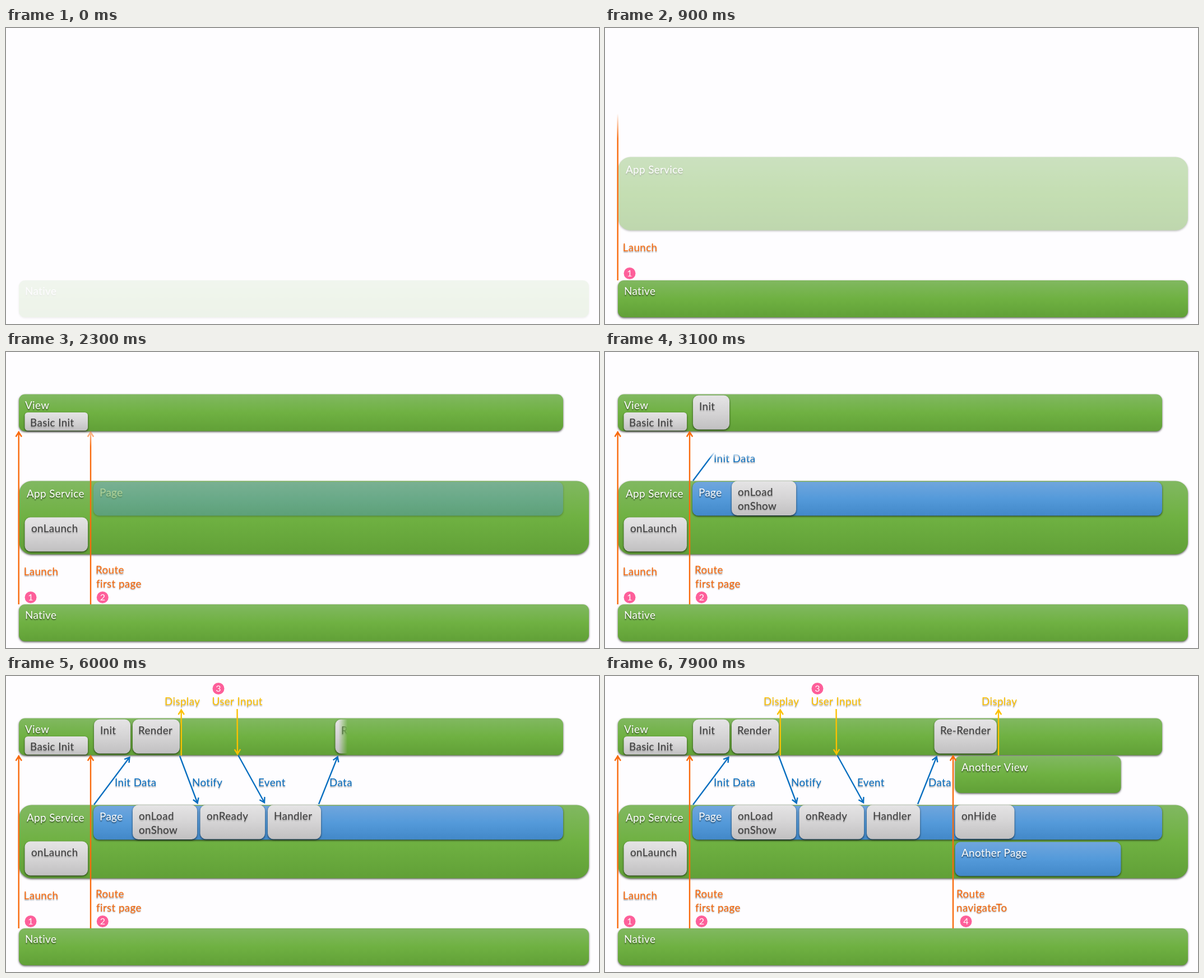
An HTML page with a canvas for the animation above (8 s loop, 1058 by 529 pixels).

```html
<!DOCTYPE html>
<html lang="en">
<head>
<meta charset="utf-8">
<title>Page lifecycle</title>
<style>
html, body { margin: 0; width: 100%; height: 100%; overflow: hidden; background: #fefdff; }
canvas { display: block; }
</style>
</head>
<body>
<canvas id="stage" width="1058" height="529"></canvas>
<script>
const W = 1058, H = 529, LOOP = 8000, STEP = 100;
const GREEN = ['#81b861', '#6fb142', '#61a037'];
const BLUE = ['#70a6dd', '#549ada', '#4288c8'];
const GRAY = ['#e5e4e5', '#d5d4d5', '#c1c0c1'];
const ORANGE = '#f96a0c', YELLOW = '#fcc000', NAVY = '#0a6fc0', PINK = '#fd5f9a';

const stage = document.getElementById('stage').getContext('2d');
const layerCanvas = Object.assign(document.createElement('canvas'), { width: W, height: H });
const layer = layerCanvas.getContext('2d');
let ctx = stage;

function shadow(alpha, y, blur) {
  ctx.shadowColor = `rgba(0,0,0,${alpha})`;
  ctx.shadowOffsetY = y;
  ctx.shadowBlur = blur;
}

function text(lines, x, y, color, alpha = 0.5) {
  ctx.save();
  ctx.font = '18.8px Lato, Carlito, sans-serif';
  ctx.letterSpacing = '0.4px';
  ctx.fillStyle = color;
  shadow(alpha, 1.5, 2);
  lines.split('\n').forEach((line, i) => {
    ctx.fillText(line, x + ctx.measureText(line).actualBoundingBoxLeft, y + i * 24.5);
  });
  ctx.restore();
}

function box(x, y, w, h, r, colors, label, tx, ty) {
  ctx.save();
  const fill = ctx.createLinearGradient(0, y, 0, y + h);
  colors.forEach((c, i) => fill.addColorStop(i / 2, c));
  ctx.fillStyle = fill;
  shadow(0.63, 1.5, 3.5);
  ctx.beginPath();
  ctx.roundRect(x, y, w, h, r);
  ctx.fill();
  ctx.restore();
  text(label, tx, ty, colors === GRAY ? '#3c3c3c' : '#fff', colors === GRAY ? 0.3 : 0.55);
}

function arrow(x1, y1, x2, y2, color) {
  ctx.save();
  ctx.strokeStyle = color;
  ctx.lineWidth = 2.4;
  ctx.beginPath();
  ctx.moveTo(x1, y1);
  ctx.lineTo(x2, y2);
  ctx.translate(x2, y2);
  ctx.rotate(Math.atan2(y2 - y1, x2 - x1));
  ctx.moveTo(-9.5, -5.2);
  ctx.lineTo(-1, 0);
  ctx.lineTo(-9.5, 5.2);
  ctx.stroke();
  ctx.restore();
}

function badge(n, x, y) {
  ctx.save();
  ctx.fillStyle = PINK;
  ctx.beginPath();
  ctx.arc(x, y, 10.5, 0, 7);
  ctx.fill();
  ctx.fillStyle = '#fff';
  ctx.font = '16px Lato, Carlito, sans-serif';
  ctx.textAlign = 'center';
  ctx.fillText(n, x, y + 5.8);
  ctx.restore();
}

const scenes = [];
const add = (start, length, effect, from, to, draw) =>
  scenes.push({ start, length, effect, from, to, draw });

const panel = (start, ...args) => add(start, 500, 'fade', 0, 0, () => box(...args));

const card = (start, x, y, w, h, r, label, tx, ty) =>
  add(start, 500, 'x', x, x + w, () => box(x, y, w, h, r, GRAY, label, tx, ty));

const link = (start, x1, y1, x2, y2, color, label, tx, ty, length = 250) =>
  add(start, length, 'y', y1, y2, () => {
    arrow(x1, y1, x2, y2, color);
    text(label, tx, ty, color, 0.35);
  });

const route = (start, n, x, label, ty) =>
  add(start, 500, 'y', 451, 141, () => {
    arrow(x, 451, x, 142, ORANGE);
    text(label, x + (n === 4 ? 7 : 10), ty, ORANGE, 0.4);
    badge(n, x + (n === 4 ? 23 : 21.3), 438.5);
  });

panel(-50, 23, 451, 1017, 66, 11, GREEN, 'Native', 35, 477);
panel(700, 23.5, 230.5, 1016.5, 131, 22, GREEN, 'App Service', 37, 260);
panel(920, 23, 75.5, 971, 66, 11, GREEN, 'View', 34, 102);
route(480, 1, 22.7, 'Launch', 399);
card(1400, 33.5, 108, 112.5, 32.5, 5.5, 'Basic Init', 44, 133);
card(1400, 33.5, 295.5, 112.5, 61, 10, 'onLaunch', 45, 322);
route(1840, 2, 151, 'Route\nfirst page', 396);
panel(2100, 156, 232, 838, 60.5, 10, BLUE, 'Page', 168, 258);
card(2470, 157, 77.5, 65, 61, 10, 'Init', 169, 104);
card(2470, 226, 230.5, 115, 61.5, 10, 'onLoad\nonShow', 237, 257);
link(2970, 157, 230, 221, 144.5, NAVY, 'Init Data', 195, 197);
card(3220, 226, 77.5, 84, 61, 10, 'Render', 237, 104);
link(3720, 312.7, 142, 312.7, 59.5, YELLOW, 'Display', 284, 52);
link(3720, 310, 143, 342, 228, NAVY, 'Notify', 333, 197);
card(3970, 346.5, 230.5, 115.5, 61, 10, 'onReady', 358, 257);
add(4470, 500, 'y', 12, 141, () => {
  badge(3, 379, 22.5);
  text('User Input', 368.5, 52, YELLOW, 0.35);
  arrow(412.5, 59, 413, 140.5, YELLOW);
});
link(4970, 414.5, 142, 461.5, 227, NAVY, 'Event', 451, 197);
card(5220, 467, 230.5, 95, 61, 10, 'Handler', 479, 257);
link(5665, 558, 229, 592, 143.5, NAVY, 'Data', 578, 197);
card(5915, 587.5, 77.5, 111.5, 61, 10, 'Re-Render', 599, 104);
link(6415, 702, 142, 702, 59.5, YELLOW, 'Display', 673, 52);
panel(7165, 624.5, 143, 296, 66, 10, GREEN, 'Another View', 636, 170);
panel(6915, 624.5, 296.5, 296, 61, 10, BLUE, 'Another Page', 636, 323);
card(7165, 624.5, 230.5, 106, 60.5, 10, 'onHide', 636, 257);
route(6665, 4, 621, 'Route\nnavigateTo', 396);

// Reveals part of a scene: a plain fade or a soft-edged wipe.
function reveal(scene, p) {
  ctx = layer;
  layer.clearRect(0, 0, W, H);
  scene.draw();
  ctx = stage;
  if (scene.effect !== 'fade') {
    const span = scene.to - scene.from, edge = 0.145 * span;
    const front = scene.from + p * (span + edge);
    const mask = scene.effect === 'x'
      ? layer.createLinearGradient(front - edge, 0, front, 0)
      : layer.createLinearGradient(0, front - edge, 0, front);
    mask.addColorStop(0, '#000');
    mask.addColorStop(1, 'transparent');
    layer.save();
    layer.globalCompositeOperation = 'destination-in';
    layer.fillStyle = mask;
    layer.fillRect(0, 0, W, H);
    layer.restore();
  }
  stage.save();
  stage.globalAlpha = scene.effect === 'fade' ? p : 1;
  stage.drawImage(layerCanvas, 0, 0);
  stage.restore();
}

function render() {
  const t = Math.floor((performance.now() % LOOP) / STEP) * STEP;
  stage.fillStyle = '#fefdff';
  stage.fillRect(0, 0, W, H);
  for (const scene of scenes) {
    const p = (t - scene.start) / scene.length;
    if (p >= 1) scene.draw();
    else if (p > 0) reveal(scene, p);
  }
  requestAnimationFrame(render);
}
render();
</script>
</body>
</html>
```
